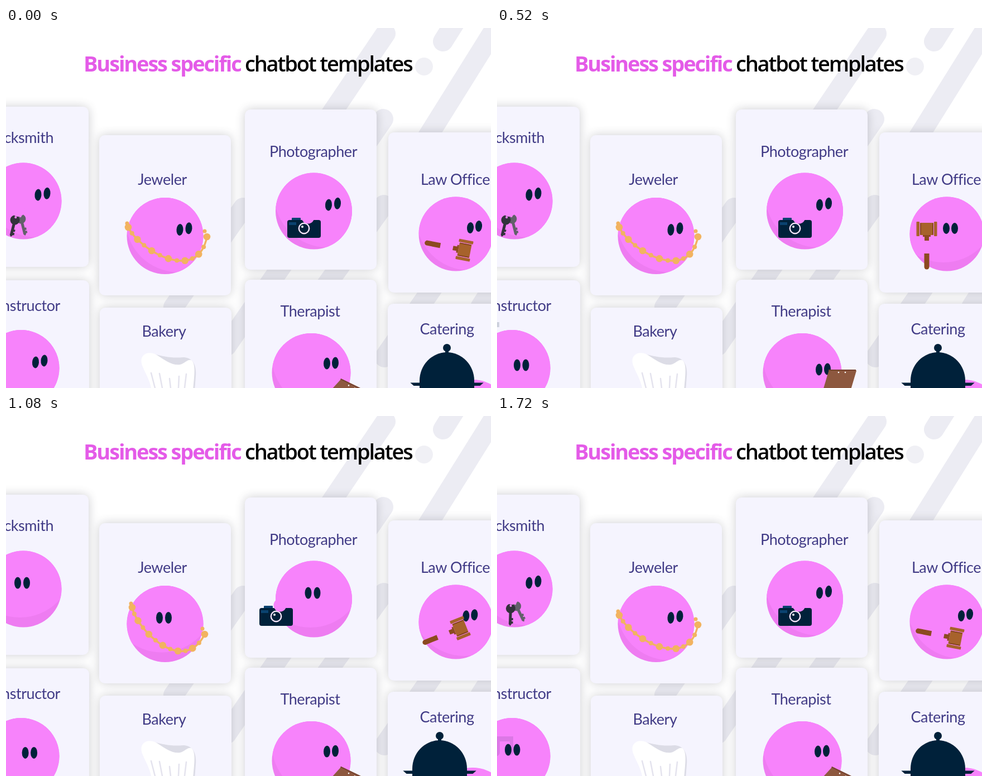
Recreate the animation shown at these times as an HTML page. Size 869 by 645 pixels, loop 1760 ms.

```html
<!DOCTYPE html>
<html lang="en">
<head>
<meta charset="utf-8">
<title>Chatbot templates</title>
<style>
  html, body { margin: 0; width: 100%; height: 100%; overflow: hidden; background: #fff; }
  svg { display: block; width: 869px; height: 645px; }
  .title { font: 600 38px "Open Sans", "Noto Sans", sans-serif; letter-spacing: -2.17px; }
  .title .accent { font-weight: 700; fill: #e45be8; }
  .label { font: 400 27px Lato, "Open Sans", sans-serif; letter-spacing: -.45px; fill: #413b86; }
</style>
</head>
<body>
<svg viewBox="0 0 869 645">
  <defs><filter id="soft" x="-10%" y="-10%" width="120%" height="120%"><feGaussianBlur stdDeviation="9"/></filter></defs>
  <g stroke="#ececf3" stroke-width="36" stroke-linecap="round" fill="none">
    <path d="M680 10L560 187M783 24L812 -22M877 0L749 205M676 163L395 570M677 317L560 480M425 322L300 500M678 590L765 465M850 500L869 470"/>
    <circle cx="749" cy="69" r="16" fill="#f0f0f5" stroke="none"/>
  </g>
  <g id="shadows" filter="url(#soft)" fill="#333340" opacity=".24"></g>
  <g id="cards" fill="#f5f4fe"></g>
  <text class="title" y="78"><tspan class="accent" x="139">Business specific</tspan><tspan x="428">chatbot templates</tspan></text>
  <g id="labels" class="label"></g>
  <g id="scene"></g>
</svg>
<script>
const LOOP = 1760, NAVY = '#00213a', PINK = '#f783fb', SHADE = '#ee7cf1', GOLD = '#f2b360', WOOD = '#a7622b', DARK_WOOD = '#8c4a20';
const byId = id => document.getElementById(id);

// Timing helpers
const mix = (a, b, u) => a + (b - a) * u;
const ease = (t, from, to) => {
  const u = Math.min(1, Math.max(0, (t - from) / (to - from)));
  return u * u * (3 - 2 * u);
};
const pulse = (t, peak, width) => 1 - ease(Math.abs(t - peak), 0, width);

// Drawing helpers
const group = (x, y, angle, body, opacity = 1) =>
  `<g transform="translate(${x} ${y}) rotate(${angle})" opacity="${opacity}">${body}</g>`;
const dot = (x, y, r, fill) => `<circle cx="${x}" cy="${y}" r="${r}" fill="${fill}"/>`;
const box = (x, y, w, h, fill, r = 0) =>
  `<rect x="${x}" y="${y}" width="${w}" height="${h}" rx="${r}" fill="${fill}"/>`;
const shape = (d, fill) => `<path d="${d}" fill="${fill}"/>`;

// Static cards: corner, label and label anchor point
const cards = [
  { x: -88, y: 141, label: 'Locksmith', at: [85, 206], anchor: 'end' },
  { x: 167, y: 192, label: 'Jeweler', at: [280, 281] },
  { x: 428, y: 146, label: 'Photographer', at: [550.5, 231] },
  { x: 685, y: 187, label: 'Law Office', at: [805, 281] },
  { x: -87, y: 452, label: 'Music Instructor', at: [97, 507], anchor: 'end' },
  { x: 168, y: 501, label: 'Bakery', at: [283, 553] },
  { x: 428, y: 451, label: 'Therapist', at: [545, 517] },
  { x: 684, y: 494, label: 'Catering', at: [790, 549] }
];
const rects = cards.map(({ x, y }) => `<rect x="${x}" y="${y}" width="236" height="287" rx="10"/>`).join('');
byId('shadows').innerHTML = byId('cards').innerHTML = rects;
byId('labels').innerHTML = cards.map(({ label, at, anchor = 'middle' }) =>
  `<text x="${at[0]}" y="${at[1]}" text-anchor="${anchor}">${label}</text>`).join('');

function eyes(x, y, gap, lift = 0, ry = 10.5) {
  const eye = (cx, cy) => group(cx, cy, lift * 1.5, `<ellipse rx="6" ry="${ry}" fill="${NAVY}"/>`);
  return eye(x, y) + eye(x + gap, y - lift);
}

let clips = 0;
function ball(x, y, r, look) {
  const id = 'ball' + clips++;
  return `<clipPath id="${id}"><circle cx="${x}" cy="${y}" r="${r}"/></clipPath>` + dot(x, y, r, SHADE) +
    `<g clip-path="url(#${id})">${dot(x + mix(-6, 24, look), y + mix(-44, -30, look), 95, PINK)}</g>`;
}

// look: 0 faces forward, 1 faces right; lid: 1 is fully open
const character = (x, y, r, look, lid) => ball(x, y, r, look) +
  eyes(x + mix(-10, 26.5, look), y - 11 + (1 - lid) * 11, 16, 2.7 * look, 10.5 * lid);

function locksmith(t, look, lid) {
  const swing = ease(t, 1540, 1720);
  const key = (x, y, angle, fill) => group(x, y, angle, dot(0, 0, 8.5, fill) + dot(0, -5, 2, PINK) +
    shape('M-2.5 7H2.5V28L0 31L-2.5 28ZM2 17h3v4H2ZM2 23h3v4H2Z', fill));
  const keys = key(5, 14, -14, '#62606a') + key(-6, 16, 14, '#33323c') + dot(0, -2, 12, PINK);
  return character(31, 310, 68.5, look, lid) + group(mix(-30, 22, look) + 5 * swing, 328, -12 * swing, keys);
}

function jeweler(look, lid) {
  const forward = [[226, 343], [236, 386], [319, 465], [356, 391]];
  const right = [[219, 357], [239.5, 399], [343.5, 459], [360, 374]];
  const [a, b, c, d] = forward.map((p, i) => p.map((v, j) => mix(v, right[i][j], look)));
  const along = (u, j) => (1 - u) ** 3 * a[j] + 3 * u * (1 - u) ** 2 * b[j] + 3 * u * u * (1 - u) * c[j] + u ** 3 * d[j];
  let beads = dot(a[0] - 2, a[1] - 7, 3.5, GOLD) + dot(d[0] - 4, d[1] - 10, 3.5, GOLD);
  for (let i = 0; i <= 12; i++) beads += dot(along(i / 12, 0), along(i / 12, 1), i % 2 ? 4 : 6.3, GOLD);
  return character(285, 372.5, 68.5, look, lid) +
    `<path d="M${a}C${b} ${c} ${d}" fill="none" stroke="${GOLD}" stroke-width="3.5"/>` + beads;
}

function photographer(look, lid) {
  const camera = box(8, -4, 16, 8, '#0a4370', 1) + box(0, 0, 60, 32, NAVY, 4) + box(3, 4, 13, 5, '#0a4370') +
    `<circle cx="30" cy="15" r="9.2" fill="${NAVY}" stroke="#f8e6fb" stroke-width="2.4"/>` +
    dot(27, 12, 2, '#fff') + dot(37, -5, 11.5, PINK);
  return character(551.5, 328, 68.5, look, lid) + group(mix(454, 504, look), 344, 0, camera);
}

function lawOffice(t) {
  const look = 1 - ease(t, 60, 290) + ease(t, 900, 1180);
  const raise = ease(t, 60, 470) - ease(t, 840, 1230);
  const impact = pulse(t, 1280, 130);
  const gavel = shape('M-12 -4.5H-36a4.5 4.5 0 0 0 0 9H-12Z', DARK_WOOD) + shape('M11 -4H18V-7H21V7H18V4H11Z', DARK_WOOD) +
    box(21, -12, 22, 24, WOOD) + box(19, -18.5, 26, 5.5, WOOD, 1) + box(19, 13, 26, 5.5, WOOD, 1) +
    '<path d="M22 -11H42M22 11H42" stroke="#7d3f1b" stroke-width="1.5"/>';
  return ball(806, 369, 66.5, look) + eyes(mix(805, 832, look), 359 - look, 15, 3 * look, 10 - 3 * impact) +
    group(mix(770, 790, look), 392, mix(11, -90, raise) + 13 * impact, gavel);
}

function singleNote(age) {
  const x = -12 + 36 * pulse(age, 200, 600), y = 540 - 18 * ease(age, 0, 300);
  return group(x, y, 0, shape('M-21 0h6l3 5h12v9h-13V34a8 7 0 1 1-8-7Z', NAVY), ease(age, 0, 150) * (1 - ease(age, 60, 680)));
}

function doubleNote(age) {
  const slide = ease(age, 0, 340);
  return group(31 - 43 * slide, 575 - 48 * slide, 0,
    shape('M-31 0H-1V28a7.5 7 0 1 1-6-7V9H-25V29a7.5 7 0 1 1-6-7Z', NAVY), ease(age, 0, 150) - ease(age, 200, 340));
}

function instructor(t) {
  const glance = 1 - ease(t, 0, 150), dip = pulse(t, 920, 250), turn = ease(t, 1560, 1720);
  const x = 36 + 17 * glance - 10 * dip + 6 * ease(t, 1000, 1250) - 22 * turn;
  return ball(27, 609.5, 68.5, .5) + eyes(x, 604 - 5 * glance - 2 * dip - 6 * turn, 15.5, 3 * glance) +
    singleNote(t) + singleNote(t - 1080) + doubleNote(t - 780) + doubleNote(t - 1690);
}

const bakery = () =>
  shape('M262 583C282 589 299 592 317 590C333 590 342 602 340 624L338 650H300Z', '#dcdce6') +
  shape('M261 650C257 622 239 606 243 592C247 580 263 580 272 587C286 596 298 605 312 603C320 601 325 593 332 595C341 602 337 624 335 650Z', '#fff') +
  '<path d="M260 618L267 645M275 619L280 645M293 628L295 645M310 624L309 645M323 620L320 645" fill="none" stroke="#e4e3ee" stroke-width="2.5" stroke-linecap="round"/>';

function therapist(t) {
  const raise = ease(t, 40, 340) - ease(t, 800, 1100);
  const blink = pulse(t, 920, 90) + pulse(t, 1520, 90);
  const clipboard = shape('M1 0H48L50 2L37 46L-12 44Z', '#8d583f') +
    '<path d="M0 1H49" stroke="#754330" stroke-width="2"/>' + dot(18, 5, 1.3, '#fff') + dot(30, 5, 1.3, '#fff');
  return ball(547, 617.5, 70.5, 1) + eyes(575 + 2 * raise, 601 + 11 * raise, 15, 1, 10.5 - 9.3 * blink) +
    group(mix(600, 594, raise), mix(628, 612, raise), 26 * (1 - raise), clipboard);
}

function catering(look) {
  const cloche = dot(0, 573, 7, NAVY) + box(-3, 577, 6, 8, NAVY) + shape('M-49 650V632A49 51 0 0 1 49 632V650Z', NAVY) +
    `<path d="M-63 636.5H-45L-49 640H-59ZM63 636.5H45L49 640H59Z" stroke="${NAVY}" stroke-width="2" fill="${NAVY}"/>`;
  return dot(836, 698, 68, PINK) + group(mix(777, 790, look), 0, 0, cloche);
}

function draw(t) {
  clips = 0;
  const look = 1 - ease(t, 560, 770) + ease(t, 1380, 1580);
  const lid = 1 - .4 * (pulse(t, 670, 110) + pulse(t, 1510, 110));
  byId('scene').innerHTML = locksmith(t, look, lid) + jeweler(look, lid) + photographer(look, lid) +
    lawOffice(t) + instructor(t) + bakery() + therapist(t) + catering(look);
}

const start = performance.now();
function frame() {
  draw((performance.now() - start) % LOOP);
  requestAnimationFrame(frame);
}
frame();
</script>
</body>
</html>
```
